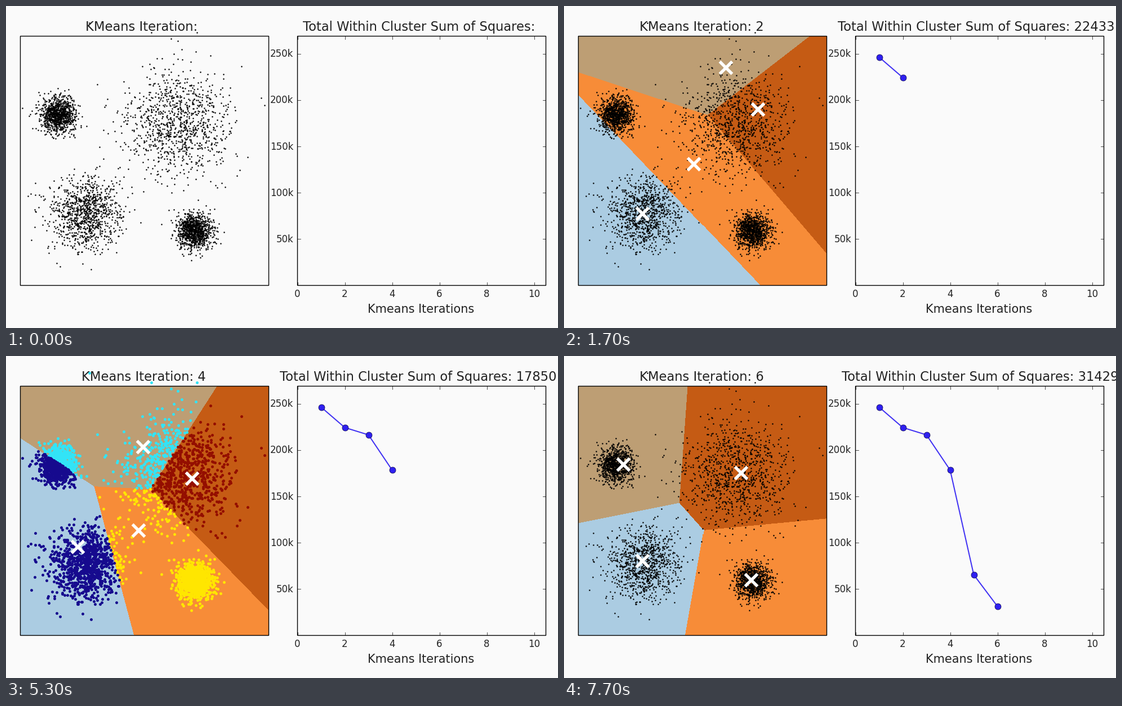
These frames come from a looping animation (980x571 px, 8000 ms). A matplotlib script:

```python
import numpy as np
import matplotlib.pyplot as plt
from matplotlib.animation import FuncAnimation
from matplotlib.patches import Rectangle

W, H, DPI = 980, 571, 100
STEP_MS, LOOP_MS = 100, 8000
PT = 72 / DPI                                   # points per pixel

LEFT, RIGHT, TOP, BOTTOM = 25, 466, 53, 495     # scatter panel
PLOT_L, PLOT_R = 517, 958                       # line chart panel
X_MAX, Y_MAX = 10.5, 269000

INTRO_MS, ROUND_MS, PHASE_MS = 200, 1500, 500
SUMS = [246339, 224330, 216460, 178500, 65399, 31429]

# Blob centre x, y and spread
BLOBS = [(92, 193, 15.5), (304, 208, 47), (141, 368, 31), (334, 399, 15.5)]
START = [(389.5, 85), (401.5, 119.5), (235, 275), (127, 385)]
REGION = ["#bd9e74", "#c55b14", "#f78c38", "#abcce2"]
POINT = ["#32e4f7", "#940e00", "#ffe600", "#160a8e"]
INK = "#222222"


def blob(rng, x, y, spread, n=1000):
    z = rng.normal(size=(n, 2))
    z = (z - z.mean(axis=0)) / z.std(axis=0)
    return z * spread + (x, y)


def nearest(xy, centres):
    d = xy[..., None, :] - centres
    return (d ** 2).sum(axis=-1).argmin(axis=-1)


# Run k-means, keeping every round
rng = np.random.default_rng(4)
points = np.vstack([blob(rng, *b) for b in BLOBS])
centroids, labels = [np.array(START)], []
for _ in SUMS:
    labels.append(nearest(points, centroids[-1]))
    centroids.append(np.array([points[labels[-1] == j].mean(axis=0)
                               for j in range(len(START))]))

gx, gy = np.meshgrid(np.arange(LEFT, RIGHT) + 0.5, np.arange(TOP, BOTTOM) + 0.5)
grid = np.stack([gx, gy], axis=-1)
palette = np.array([plt.matplotlib.colors.to_rgb(c) for c in REGION])
regions = [palette[nearest(grid, c)] for c in centroids[:-1]]

plt.rcParams["font.family"] = "DejaVu Sans"
fig = plt.figure(figsize=(W / DPI, H / DPI), dpi=DPI, facecolor="#fafafa")
ax = fig.add_axes([0, 0, 1, 1])
ax.axis("off")


def chart_x(i):
    return PLOT_L + 0.5 + i * (PLOT_R - PLOT_L) / X_MAX


def chart_y(v):
    return BOTTOM + 0.5 - v * (BOTTOM - TOP) / Y_MAX


def tick(x, y, dx, dy):
    ax.plot([x, x + dx], [y, y + dy], color="black", lw=0.5, zorder=5)


def label(x, y, s, size, ha="left"):
    return ax.text(x, y, s, fontsize=size, ha=ha, va="baseline", color=INK)


def box(x0, x1):
    ax.add_patch(Rectangle((x0, TOP), x1 - x0, BOTTOM - TOP, fill=False,
                           lw=1, ec="black", zorder=6))


# Static parts
box(LEFT, RIGHT)
box(PLOT_L, PLOT_R)
TICK = 5.5
for i in range(0, 11, 2):
    x = chart_x(i)
    tick(x, BOTTOM, 0, -TICK)
    tick(x, TOP, 0, TICK)
    label(x, 516, str(i), 12, ha="center")
for k in range(50, 251, 50):
    y = chart_y(k * 1000)
    tick(PLOT_L, y, TICK, 0)
    tick(PLOT_R, y, -TICK, 0)
    label(510.5, y + 5.5, f"{k}k", 12, ha="right")
label(642, 544, "Kmeans Iterations", 15)

# Moving parts
region = ax.imshow(regions[0], extent=(LEFT, RIGHT, BOTTOM, TOP),
                   aspect="auto", interpolation="nearest", zorder=1)
dots = [ax.plot([], [], "o", mew=0, zorder=3)[0] for _ in POINT]
crosses = ax.plot([], [], "x", color="white", ms=22 * PT, mew=5.4 * PT,
                  zorder=4)[0]
curve = ax.plot([], [], "o-", color="#3f30f3", lw=2 * PT, ms=11 * PT,
                mfc="#2f20f0", mec="#0a0640", mew=0.5, zorder=7)[0]
title = label(0, 44, "", 16.3)
total = label(0, 44, "", 16.3)

ax.set_xlim(0, W)
ax.set_ylim(H, 0)


def set_text(artist, x, s):
    artist.set_x(x)
    artist.set_text(s)


def timeline(ms):
    """Round and phase: 0 new regions, 1 coloured points, 2 moved centroids."""
    it, t = divmod(max(ms - INTRO_MS, 0), ROUND_MS)
    lag = 100 if it >= 3 else 0                 # later rounds linger
    return it, max((t - lag) // PHASE_MS, 0)


def draw(frame):
    ms = frame * STEP_MS
    started = ms >= INTRO_MS
    it, phase = timeline(ms)
    colored = phase > 0

    region.set_visible(started)
    region.set_data(regions[it])
    for j, d in enumerate(dots):
        d.set_data(*points[labels[it] == j].T)
        d.set_color(POINT[j] if colored else "black")
        d.set_markersize((5 if colored else 2.5) * PT)

    crosses.set_visible(started)
    crosses.set_data(*centroids[it + (phase == 2)].T)

    n = it + 1 if started else 0
    curve.set_data([chart_x(i + 1) for i in range(n)],
                   [chart_y(v) for v in SUMS[:n]])

    heading = "Total Within Cluster Sum of Squares:"
    if started:
        set_text(title, 134, f"KMeans Iteration: {n}")
        # The heading runs off the right edge after five digits
        x = 486 if SUMS[it] > 99999 else 493
        set_text(total, x, f"{heading} {str(SUMS[it])[:5]}")
    else:
        set_text(title, 141, "KMeans Iteration:")
        set_text(total, 527, heading)
    return [region, *dots, crosses, curve, title, total]


anim = FuncAnimation(fig, draw, frames=LOOP_MS // STEP_MS, interval=STEP_MS,
                     init_func=lambda: draw(0), repeat=True, repeat_delay=0)
plt.show()
```
